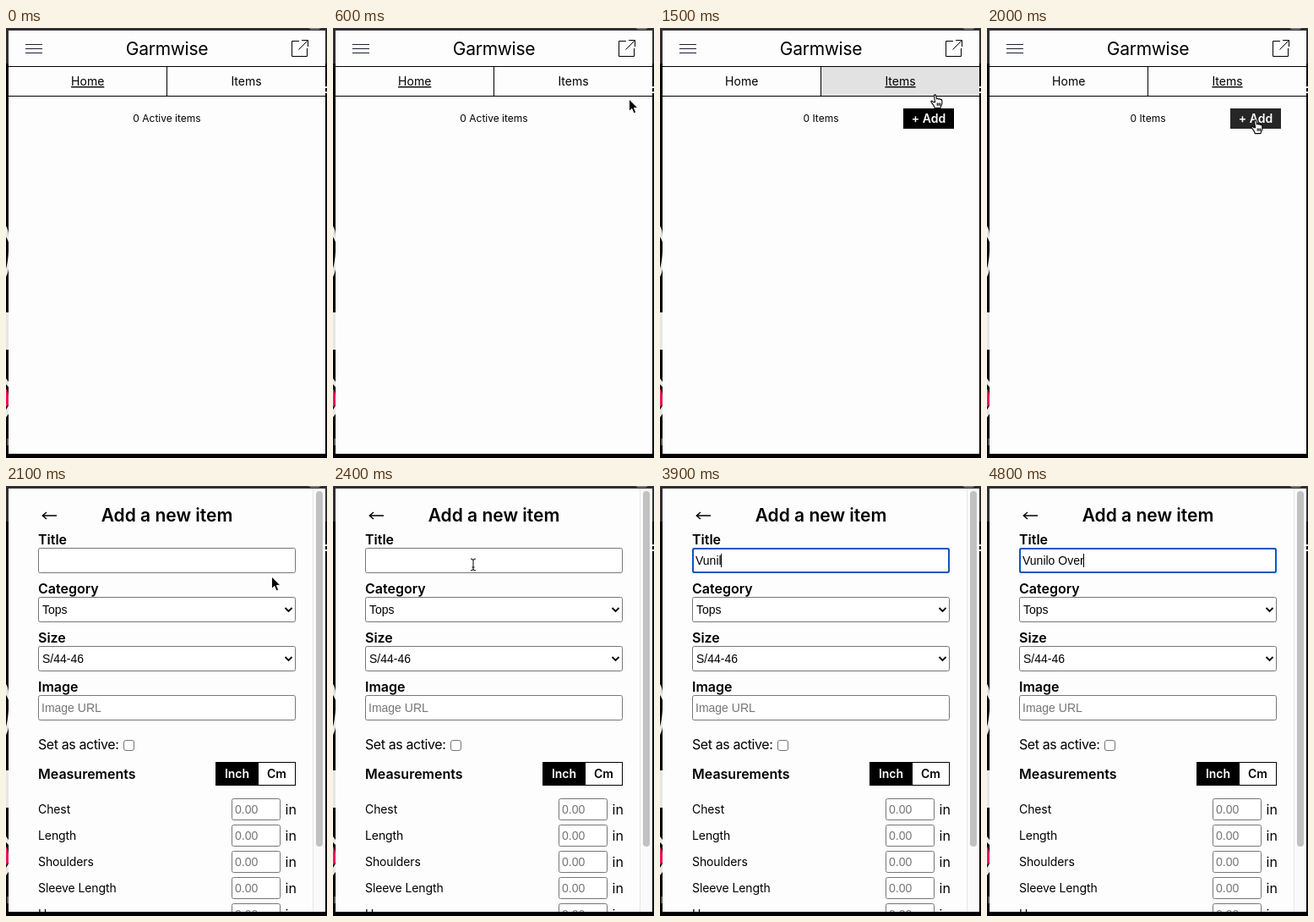
Write an HTML page that moves like this. It is 380x508 px and loops after 5 s.

```html
<!DOCTYPE html>
<html lang="en">
<head>
<meta charset="utf-8">
<title>Wardrobe item form</title>
<style>
  html, body { margin: 0; width: 100%; height: 100%; overflow: hidden; background: #000; }
  svg { display: block; }
  text { font: 14px Inter, sans-serif; white-space: pre; }
  .mid { text-anchor: middle; }
  .b { font-weight: 600; }
  .small { font-size: 12px; }
  .label { font-size: 16px; font-weight: 600; }
  .field { font: 14px "Liberation Sans", Arial, sans-serif; }
  .hint { fill: #757575; }
  .row { letter-spacing: -.1px; }
  .line { fill: none; stroke: #000; }
  .box { fill: #fff; stroke: #767676; }
  .on { text-decoration: underline; }
  [hidden] { display: none; }
</style>
</head>
<body>
<svg width="380" height="508" viewBox="0 0 380 508">
  <defs>
    <clipPath id="win"><rect x="3" y="3" width="375" height="500"/></clipPath>
  </defs>

  <!-- Desktop showing around the window -->
  <rect width="380" height="508"/>
  <path fill="#302e30" d="M0 0H380V42H0z"/>
  <path fill="#777" d="M358 0H373L370 2H361z"/>
  <g fill="#e6e6e6">
    <path d="M0 234Q3 238 3 246V253Q1 248 0 247z"/>
    <path d="M3 264V285Q2 291 0 294V284Q2 278 3 264z"/>
    <path d="M0 336H3V380H0z"/>
    <path d="M0 414L3 418V424L0 421zM0 451L3 446V456L0 460z"/>
    <path d="M378 69H380V71H378zM378 75H380V77H378z"/>
  </g>
  <path fill="#e8175d" d="M0 426Q3 430 3 436V445L0 448z"/>
  <path fill="#555" d="M1 485H3V493H1z"/>

  <g clip-path="url(#win)">
    <rect x="3" y="3" width="375" height="500" fill="#fdfdfd"/>

    <g id="list">
      <rect id="hover" x="191" y="46" width="187" height="34" fill="#e2e2e2"/>
      <path class="line" d="M3 45.5H378M3 80.5H378M190.5 45V81"/>
      <path class="line" stroke-width="1.1" style="stroke:#1b2030" d="M23 19.5H43M23 24.5H43M23 29.5H43"/>
      <path class="line" d="M347 15.5H338.5V33.5H356.5V24M346.5 25.5L357.5 14.5M350 14.5H357.5V22"/>
      <text class="mid" x="190.5" y="32" style="font-size:21px;letter-spacing:-.3px">Garmwise</text>
      <text class="mid" id="home" x="96.7" y="68">Home</text>
      <text class="mid" id="items" x="284.5" y="68">Items</text>
      <text class="mid small" id="count" x="190.5" y="111"></text>
      <g id="add">
        <rect id="addBox" x="288" y="95" width="60" height="24"/>
        <text class="mid b" x="318" y="112" fill="#fff">+ Add</text>
      </g>
    </g>

    <g id="form">
      <path class="line" stroke-width="1.4" d="M43 35H60M48 31L43.3 35L48 39"/>
      <text class="mid b" x="190.5" y="42" style="font-size:21px">Add a new item</text>
      <g id="fields"></g>
      <text class="field hint" x="42" y="267">Image URL</text>
      <text x="38" y="311" style="font-size:16px;letter-spacing:-.4px">Set as active:</text>
      <rect class="box" x="139.5" y="300.5" width="12" height="12" rx="2.5"/>
      <text class="label" x="38" y="346">Measurements</text>
      <rect x="248.5" y="326.5" width="94" height="27" fill="#fff" stroke="#000"/>
      <path d="M248 326H299V354H248z"/>
      <text class="mid b" x="273.5" y="345" fill="#fff">Inch</text>
      <text class="mid b" x="320.5" y="345">Cm</text>
      <g id="rows"></g>
      <rect id="ring" x="39" y="74" width="303" height="28" rx="2" fill="none" stroke="#0a58c0" stroke-width="2"/>
      <text class="field" id="typed" x="42" y="93"></text>
      <rect id="caret" y="80" width="1" height="16"/>
      <path fill="#fafafa" d="M363 3H378V503H363z"/>
      <path class="line" style="stroke:#e6e6e6" d="M363.5 3V503"/>
      <rect x="367" y="6" width="8" height="420" rx="4" fill="#c1c1c1"/>
    </g>
  </g>

  <!-- Pointers, each with its hot spot at 0,0 -->
  <g id="pointer">
    <path id="arrow" stroke="#fff" stroke-width="1" d="M0 0V14.5L3.3 11.4L5.6 16.8L8.2 15.7L5.9 10.4H10.4z"/>
    <path id="hand" fill="#fff" stroke="#000" stroke-width="1.1" transform="translate(-5 -1)" stroke-linejoin="round"
      d="M3.9 9.6C2.6 8.5 1 7.6.8 8.6C.6 9.4 2.6 11.4 3.8 13.4C4.6 14.6 5 15 5.2 16.6H12C12 15 13.6 13 13.8 11.4C14 9.6 13.9 8 13.6 7C13.3 6 12.2 6.1 12 6.8C11.8 5.6 10.2 5.4 9.8 6.3C9.4 5.1 8 5 7.6 5.9L6.6 1.8C6.2.4 4.2.7 4.5 2.2L5.6 9.8zM8.2 10.5V13.8M9.9 10.5V13.8M11.6 10.5V13.8"/>
    <g id="beam" fill="none">
      <path stroke="#fff" stroke-width="2.4" d="M-3 -7Q0 -7 0 -5Q0 -7 3 -7M0 -5V5M-3 7Q0 7 0 5Q0 7 3 7M-1.5 3H1.5"/>
      <path stroke="#000" d="M-3 -7Q0 -7 0 -5Q0 -7 3 -7M0 -5V5M-3 7Q0 7 0 5Q0 7 3 7M-1.5 3H1.5"/>
    </g>
  </g>
</svg>

<script>
const LOOP = 5000;
const $ = id => document.getElementById(id);
const show = (id, on) => $(id).toggleAttribute("hidden", !on);

const box = (x, y, w, h) =>
  `<rect class="box" x="${x + .5}" y="${y + .5}" width="${w - 1}" height="${h - 1}" rx="2"/>`;

$("fields").innerHTML = [["Title"], ["Category", "Tops"], ["Size", "S/44-46"], ["Image"]]
  .map(([name, value], i) => {
    const y = 73 + 58 * i;
    const select = value ? `<text class="field" x="43" y="${y + 20}">${value}</text>
      <path class="line" stroke-width="1.8" d="M330.5 ${y + 13}l4 4l4 -4"/>` : "";
    return `<text class="label" x="38" y="${y - 4}">${name}</text>${box(38, y, 305, 30)}${select}`;
  }).join("");

$("rows").innerHTML = ["Chest", "Length", "Shoulders", "Sleeve Length", "Hem"]
  .map((name, i) => {
    const y = 369 + 31 * i;
    return `<text class="row" x="38" y="${y + 18}">${name}</text>${box(267, y, 58, 26)}
      <text class="field hint" x="271" y="${y + 18}">0.00</text>
      <text x="330.5" y="${y + 19}" style="font-size:16px">in</text>`;
  }).join("");

// Pointer steps: time, shape, x, y
const moves = [
  [0, ""],
  [300, "arrow", 371, 232], [400, "arrow", 364, 180], [500, "arrow", 356, 122],
  [600, "arrow", 350.5, 84], [700, "hand", 336, 68], [800, "hand", 328, 62],
  [1500, "hand", 325, 79], [1600, "hand", 319, 99], [1700, "hand", 317, 109],
  [2100, "arrow", 314.5, 107], [2200, "arrow", 288, 104], [2300, "beam", 220, 97],
  [2400, "beam", 166, 93], [2500, "beam", 149.5, 92], [3400, ""]
];

// Typing steps: time, characters so far
const title = "Vunilo Over";
const keys = [[0, 0], [3300, 1], [3600, 2], [3700, 3], [3800, 4], [3900, 5],
  [4100, 7], [4300, 8], [4500, 9], [4700, 10], [4800, 11]];

const at = (steps, t) => steps.findLast(s => s[0] <= t);

function draw(t) {
  const form = t >= 2100, items = t >= 1000;
  show("list", !form);
  show("form", form);
  show("hover", t >= 700 && t < 1600);
  show("add", items);
  $("home").classList.toggle("on", !items);
  $("items").classList.toggle("on", items);
  $("count").textContent = items ? "0 Items" : "0 Active items";
  $("addBox").setAttribute("fill", t >= 1600 ? "#262626" : "#000");

  const typed = $("typed");
  typed.textContent = title.slice(0, at(keys, t)[1]);
  show("ring", t >= 2500);
  show("caret", t >= 2500 && !(t >= 3100 && t < 3300));
  if (form) {
    const width = typed.textContent ? typed.getComputedTextLength() : 0;
    $("caret").setAttribute("x", Math.floor(42 + width));
  }

  const [, shape, x = 0, y = 0] = at(moves, t);
  for (const id of ["arrow", "hand", "beam"]) show(id, id === shape);
  $("pointer").setAttribute("transform", `translate(${x} ${y})`);
}

function tick() {
  draw(performance.now() % LOOP);
  requestAnimationFrame(tick);
}
tick();
</script>
</body>
</html>
```
